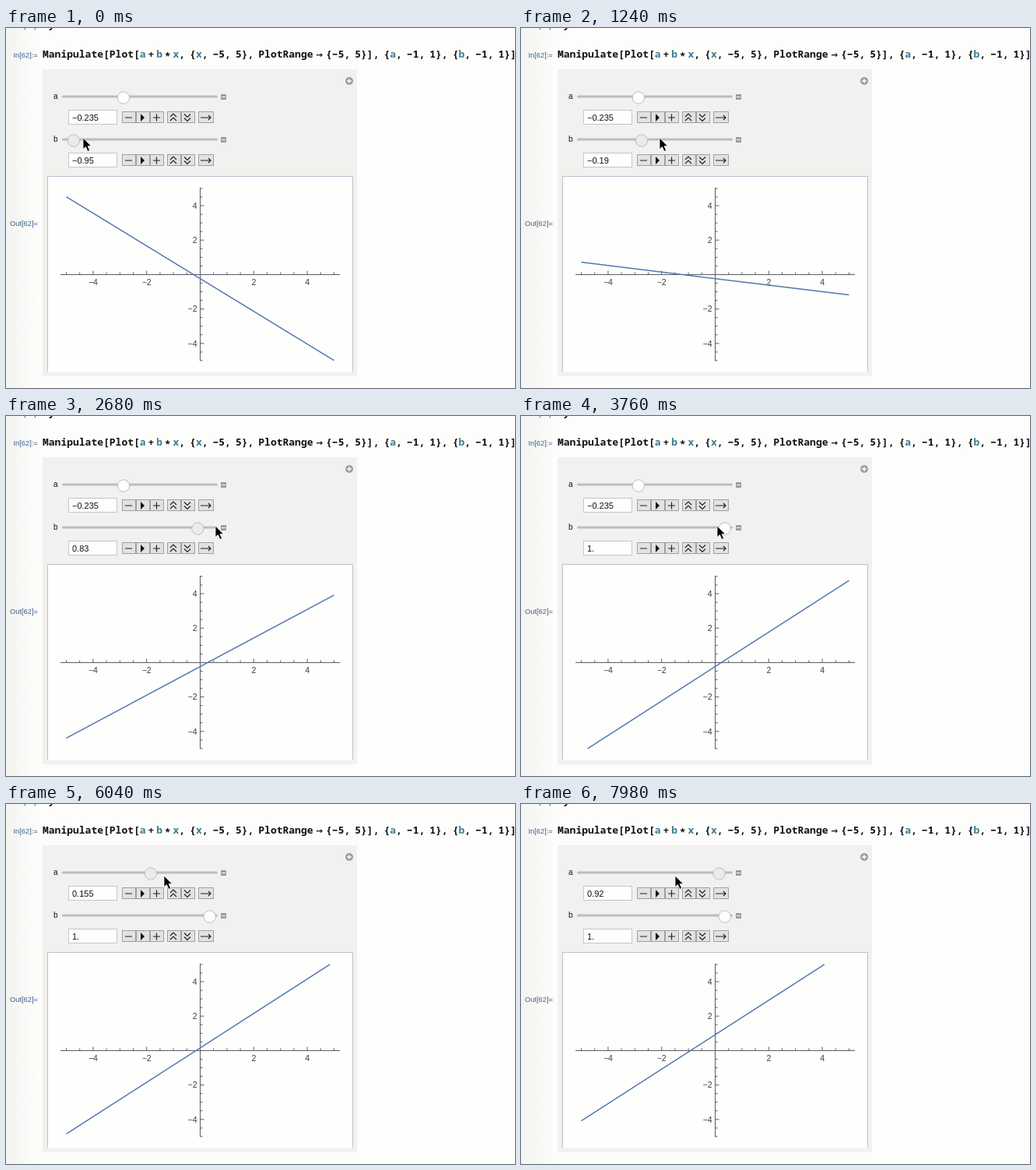
An HTML page for the animation above (8000 ms loop, 654 by 462 pixels).

```html
<!DOCTYPE html>
<html lang="en">
<head>
<meta charset="utf-8">
<title>Line explorer</title>
<style>
  html, body { margin: 0; width: 100%; height: 100%; overflow: hidden; background: #fdfdfc; }
  svg { display: block; width: 654px; height: 462px; }
  text { font: 10.5px "Liberation Sans", Arial, sans-serif; fill: #3a3a3c; white-space: pre; }
  .code { font: 600 13px "Noto Sans Mono", "DejaVu Sans Mono", monospace; fill: #111; word-spacing: -1.8px; }
  .code .tight { word-spacing: -4.95px; }
  .code .rule { font: 700 10.5px "DejaVu Sans", sans-serif; word-spacing: .2px; }
  .code .var { fill: #3c7d91; }
  .label { font-size: 9.3px; fill: #3d608c; }
  .value { font-size: 11px; fill: #111; }
  .name { font-size: 10px; fill: #111; }
  .button { fill: #e2e2e3; stroke: #a0a09e; }
  .icon { fill: none; stroke: #222; stroke-width: 1.2; }
  .axis { fill: none; stroke: #5c5c66; }
</style>
</head>
<body>
<svg viewBox="0 0 654 462">
  <defs>
    <linearGradient id="margin">
      <stop offset="0" stop-color="#f3f3f0"/>
      <stop offset="1" stop-color="#fdfdfc"/>
    </linearGradient>
  </defs>
  <rect width="44" height="462" fill="url(#margin)"/>
  <text class="label" x="8" y="0">Out[61]=</text>
  <text class="code" x="47" y="0">Symbol</text>
  <text class="label" x="9.5" y="38">In[62]:=</text>
  <text class="code" x="47" y="38">Manipulate[Plot[<tspan class="tight"><tspan class="var">a</tspan> + <tspan class="var">b</tspan> <tspan dy="3">*</tspan><tspan dy="-3"> </tspan><tspan class="var">x</tspan></tspan>, {<tspan class="var">x</tspan>, −5, 5}, PlotRange<tspan class="rule"> → </tspan>{−5, 5}], {<tspan class="var">a</tspan>, −1, 1}, {<tspan class="var">b</tspan>, −1, 1}]</text>
  <text class="label" x="5" y="254">Out[62]=</text>

  <rect x="47" y="53" width="404" height="394" fill="#f1f1ef"/>
  <circle cx="441" cy="68" r="5" fill="#9c9c9a"/>
  <path d="M438 68h6M441 65v6" stroke="#fff" stroke-width="1.3"/>
  <rect x="53.5" y="190.5" width="392" height="251" fill="#fefefd"/>
  <path d="M53.5 441V190.5H445.5V441" fill="none" stroke="#c0c0d0"/>
  <g id="controls"></g>
  <g id="plot"></g>
  <path id="line" fill="none" stroke="#5477ae" stroke-width="1.5"/>
  <path id="cursor" d="M0 0V14.5L3.4 11.5L6 17.3L8.6 16.2L6.1 10.6H10.5Z" stroke="#fff" stroke-width=".8"/>
</svg>
<script>
const DURATION = 8000;
const LAG = 355;            // the dragged knob trails the pointer by this time
const B_RELEASE = 3200, A_PRESS = 5060, A_TURN = 7500;

const byId = id => document.getElementById(id);
const clamp = (v, low, high) => Math.min(high, Math.max(low, v));
const mix = (from, to, p) => from + (to - from) * p;
const progress = (time, start, end) => clamp((time - start) / (end - start), 0, 1);
const smooth = p => p * p * (3 - 2 * p);

const knobX = value => 82.3 + (value + 1) * 89.7;
const valueAt = x => Math.round(((x - 82.3) / 89.7 - 1) * 200) / 200;
const plotX = x => 249.5 + x * 34.4;
const plotY = y => 316.4 - y * 22.1;

function pointerX(time) {
  if (time < B_RELEASE) return Math.min(98.8 + 0.06343 * time, 286);
  if (time < A_PRESS) return mix(286, 153, smooth(progress(time, B_RELEASE, 4900)));
  if (time < A_TURN) return mix(153, 256, 1 - (1 - progress(time, A_PRESS, A_TURN)) ** 1.3);
  return 256 - 58 * ((time - A_TURN) / 480) ** 2.7;
}

const pointerY = time => mix(141, 92, smooth(progress(time, 3760, 4900)));

function format(value) {
  const digits = String(Math.abs(value));
  return (value < 0 ? "−" : "") + digits + (digits.includes(".") ? "" : ".");
}

function controlMarkup(name, y) {
  let buttons = "";
  for (let i = 0; i < 6; i++) {
    const x = 149.5 + 18 * i + (i > 2 ? 4 : 0) + (i > 4 ? 4 : 0);
    buttons += `<rect class="button" x="${x}" y="19.5" width="${i > 4 ? 19 : 17}" height="14"/>`;
  }
  return `<g transform="translate(0 ${y})">
    <text class="name" x="61" y="3">${name}</text>
    <rect x="72" y="-1.5" width="200" height="3" rx="1.5" fill="#bcbcc2"/>
    <rect x="276" y="-3" width="7" height="7" fill="#9c9c9a"/>
    <path d="M277 .5h5" stroke="#fff"/>
    <circle id="${name}Knob" cy="1.5" r="7.7" stroke="#bdbdbb"/>
    <rect x="80.5" y="17.5" width="62" height="18" fill="#fefefd" stroke="#c6c6c8"/>
    <text id="${name}Value" class="value" x="85" y="31"></text>
    ${buttons}
    <path d="M173 22l5 5l-5 5z" fill="#111"/>
    <path class="icon" d="M153 27h9M189 27h9M193.5 22.5v9
      M211 26l4-4l4 4M211 31l4-4l4 4M229 22.5l4 4l4-4M229 27.5l4 4l4-4
      M250 27h13M260 24l3 3l-3 3"/>
  </g>`;
}

function axesMarkup() {
  let path = "M70 316.5H429M249.5 205V427", labels = "";
  for (let i = -10; i <= 10; i++) {
    if (!i) continue;
    const v = i / 2, major = i % 4 === 0, length = major ? 5 : 3;
    path += `M${plotX(v)} 316.5v${-length}M249.5 ${plotY(v)}h${length}`;
    if (!major) continue;
    const label = String(v).replace("-", "−");
    labels += `<text x="${plotX(v)}" y="329.5" text-anchor="middle">${label}</text>
      <text x="245.5" y="${plotY(v) + 3.8}" text-anchor="end">${label}</text>`;
  }
  return `<path class="axis" d="${path}"/>${labels}`;
}

function showControl(name, value, active) {
  const knob = byId(name + "Knob");
  knob.setAttribute("cx", knobX(value));
  knob.setAttribute("fill", active ? "#ebebe9" : "#fefefd");
  byId(name + "Value").textContent = format(value);
}

function linePath(a, b) {
  let start = -5, end = 5;
  if (Math.abs(b) > 0.001) {
    const [low, high] = [(-5 - a) / b, (5 - a) / b].sort((p, q) => p - q);
    start = Math.max(start, low);
    end = Math.min(end, high);
  }
  const point = x => `${plotX(x)} ${plotY(a + b * x)}`;
  return `M${point(start)}L${point(end)}`;
}

function draw(now) {
  const time = now % DURATION;
  const past = time - LAG;
  const a = past < A_PRESS ? -0.235 : clamp(valueAt(pointerX(past)), -0.235, 1);
  const b = past < B_RELEASE ? clamp(valueAt(pointerX(past)), -0.95, 1) : 1;
  showControl("a", a, past > A_PRESS);
  showControl("b", b, past < B_RELEASE);
  byId("line").setAttribute("d", linePath(a, b));
  byId("cursor").setAttribute("transform",
    `translate(${Math.round(pointerX(time))} ${Math.round(pointerY(time))})`);
  requestAnimationFrame(draw);
}

byId("controls").innerHTML = controlMarkup("a", 88) + controlMarkup("b", 143);
byId("plot").innerHTML = axesMarkup();
draw(0);
</script>
</body>
</html>
```
